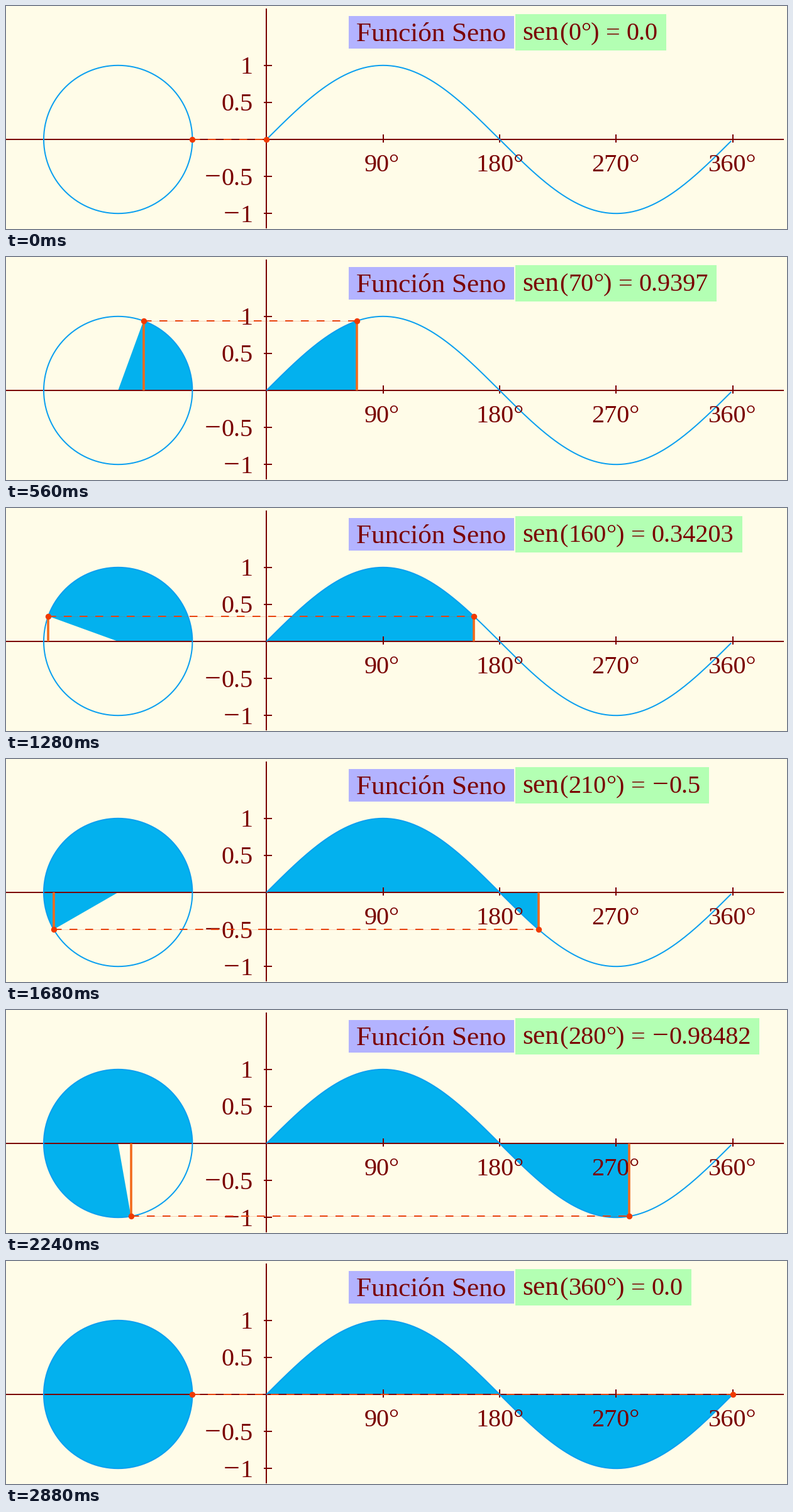
These frames come from a looping animation (1242 by 356 pixels, 2.96 s). A matplotlib script:

```python
import numpy as np
import matplotlib.pyplot as plt
from matplotlib.animation import FuncAnimation
from matplotlib.patches import Rectangle

W, H, DPI = 1242, 356, 72          # at 72 dpi one point is one pixel
CX, OX, OY, R = 178.2, 414.3, 213, 118.2
DEG = 185.35 / 90                  # pixels per degree on the x axis
STEP, FRAMES, INTERVAL = 10, 37, 80

PAPER, INK, CURVE, FILL = "#fffce8", "#7a0000", "#0a9ff0", "#03b1ee"
STEM, DASH, DOT = "#f26a1c", "#e8420e", "#f03a00"
SIZE, DIGIT = 40.3, 20.15          # font size and digit advance

plt.rcParams["font.family"] = "Liberation Serif"
fig = plt.figure(figsize=(W / DPI, H / DPI), dpi=DPI, facecolor=PAPER)
ax = fig.add_axes([0, 0, 1, 1])
ax.set_xlim(0, W)
ax.set_ylim(H, 0)
ax.axis("off")


def line(xs, ys, color=INK, width=2, z=3, **kw):
    kw.setdefault("solid_capstyle", "butt")
    return ax.plot(xs, ys, color=color, lw=width, zorder=z, **kw)[0]


def label(x, y, s, size=SIZE, ha="left"):
    return ax.text(x, y, s, size=size, color=INK, ha=ha, va="baseline", zorder=5)


def box(x, y, w, h, color):
    return ax.add_patch(Rectangle((x, y), w, h, fc=color, ec="none", zorder=1))


def circle_at(deg):
    t = np.radians(deg)
    return CX + R * np.cos(t), OY - R * np.sin(t)


def wave_at(deg):
    return OX + DEG * deg, OY - R * np.sin(np.radians(deg))


def fixed_point(v):
    """Shortest decimal for a non-negative 16-bit fixed-point value."""
    s = round(round(v, 5) * 65536)
    out = f"{s // 65536}."
    s, delta = 10 * (s % 65536) + 5, 10
    while True:
        if delta > 65536:
            s += 32768 - 50000
        out += str(s // 65536)
        s, delta = 10 * (s % 65536), delta * 10
        if s <= delta:
            return out


# axes, ticks and labels
line([0, 1237], [OY, OY])
line([OX, OX], [4, 355])
for k in range(1, 5):
    x = OX + 90 * k * DEG
    line([x, x], [204.5, 217.5])
for a, x in ((90, 570), (180, 747.5), (270, 931), (360, 1116.5)):
    label(x, 264, f"{a}°")
for v, s in ((1, "1"), (0.5, "0.5"), (-0.5, "0.5"), (-1, "1")):
    y = OY - R * v
    line([410, 423], [y, y])
    label(393, y + 13.5, s, ha="right")
    if v < 0:
        label(316 if v == -0.5 else 346, y + 13.5, "−", 46)

# circle and sine curve
line(*circle_at(np.linspace(0, 360, 241)), CURVE, z=4)
line(*wave_at(np.linspace(0, 358.8, 360)), CURVE, z=4)

# heading
box(545, 15.5, 263, 52.5, "#b3b3ff")
label(557, 55.5, "Función Seno", 43.1)
panel = box(809.5, 12.5, 240, 58.5, "#b3ffb3")
label(821.5, 54, "sen", 43.5)
label(880.5, 54, "(")
angle_text = label(894.5, 54, "")
degree, paren, equals, minus, value = (
    label(0, 54, s, z) for s, z in
    (("°", SIZE), (")", SIZE), ("=", SIZE), ("−", 46), ("", SIZE)))

# moving parts
sector, area = (ax.fill([0], [0], fc=FILL, ec="none", zorder=2)[0] for _ in range(2))
stems = [line([], [], STEM, 3.6, 6) for _ in range(2)]
trace = line([], [], DASH, 0.5, 6, alpha=0.45)
dashes = line([], [], DASH, 2, 7, dashes=(6.25, 6.25), dash_capstyle="butt")
dots = line([], [], DOT, 0, 8, marker="o", ms=9.4, mew=0)


def update(i):
    a = STEP * i
    v = round(float(np.sin(np.radians(a))), 5)
    (x0, y), (x1, _) = circle_at(a), wave_at(a)

    arc = np.linspace(0, a, 2 * a + 2)
    sector.set_xy(np.vstack([(CX, OY), np.column_stack(circle_at(arc))]))
    area.set_xy(np.vstack([(OX, OY), np.column_stack(wave_at(arc)), (x1, OY)]))
    for stem, x in zip(stems, (x0, x1)):
        stem.set_data([x, x], [OY, y])
        stem.set_visible(v != 0)
    for part in (trace, dashes, dots):
        part.set_data([x0, x1], [y, y])

    digits = fixed_point(abs(v))
    shift = 20.1 * len(str(a))
    angle_text.set_text(str(a))
    degree.set_x(894 + shift)
    paren.set_x(909.5 + shift)
    equals.set_x(933.5 + shift)
    minus.set_x(967 + shift)
    minus.set_visible(v < 0)
    x = 966.5 + shift + (27.5 if v < 0 else 0)
    value.set_x(x)
    value.set_text(digits)
    panel.set_width(x + DIGIT * (len(digits) - 1) + 23 - panel.get_x())
    return sector, area, trace, dashes, dots, panel


dashes.set_dashes((6.25, 6.25))
anim = FuncAnimation(fig, update, frames=FRAMES, interval=INTERVAL,
                     init_func=lambda: update(0), repeat=True, repeat_delay=0)
plt.show()
```
